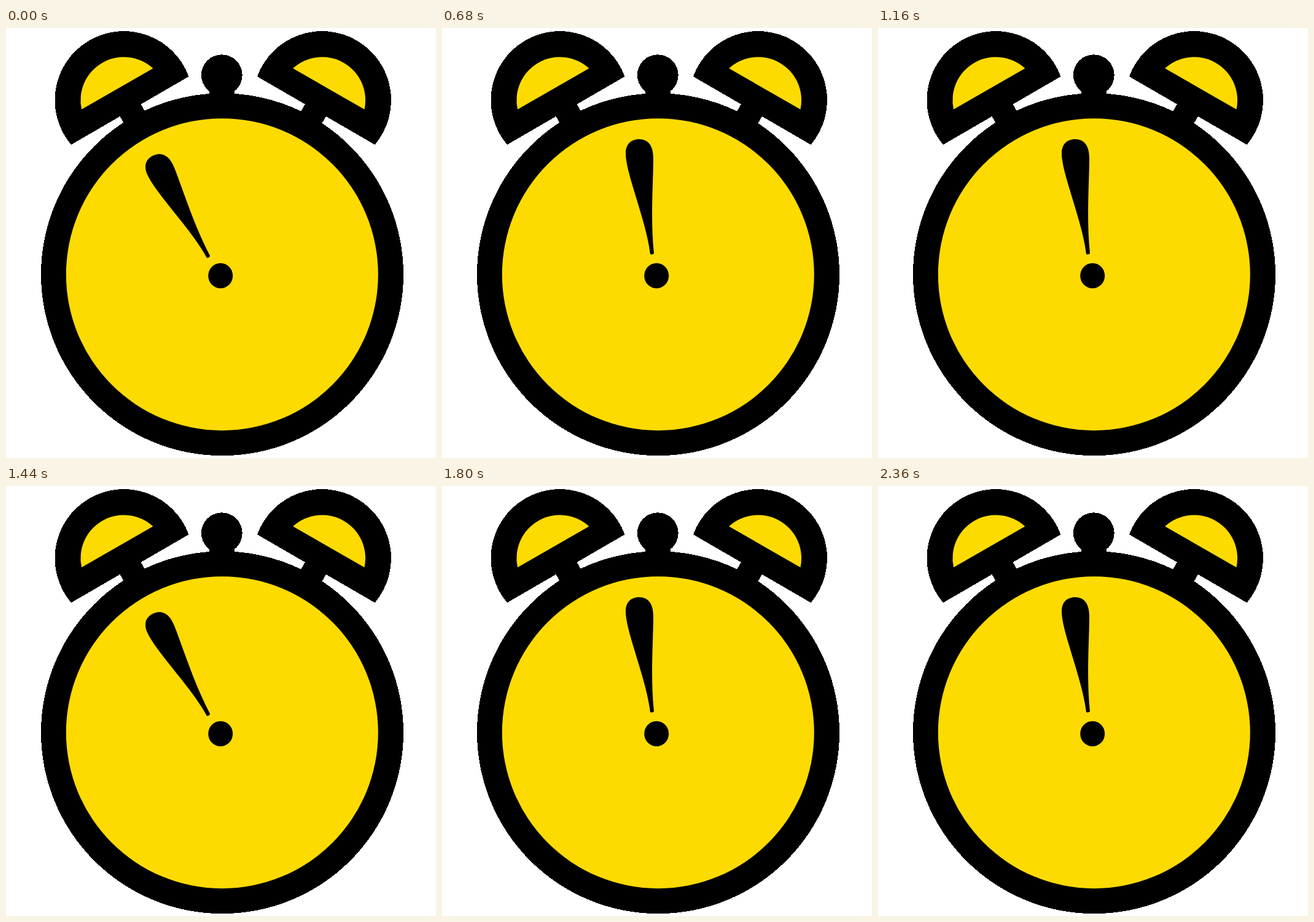
These frames come from a looping animation (700x700 px, 2400 ms). An HTML page:

```html
<!DOCTYPE html>
<html lang="en">
<head>
<meta charset="utf-8">
<title>Alarm clock</title>
<style>
  html, body { margin: 0; width: 100%; height: 100%; overflow: hidden; background: #fff; }
  svg { display: block; width: 100vw; height: 100vh; }
  .yellow { fill: #fddb00; }
  .crisp { shape-rendering: crispEdges; }
</style>
</head>
<body>
<svg viewBox="0 0 700 700">
  <defs>
    <g id="bell">
      <path class="crisp" d="M106 190A112.400 112.400 0 1 1 297.500 79Z"/>
      <path class="crisp" d="M185 143L219 123L234 149L200 169Z"/>
      <path class="yellow" d="M123 132.500A70.400 70.400 0 0 1 239.300 65.700Z"/>
    </g>
  </defs>
  <use href="#bell"/>
  <use href="#bell" transform="translate(706.500 0) scale(-1 1)"/>
  <g class="crisp">
    <circle cx="351.300" cy="76.700" r="33.400"/>
    <rect x="331" y="98" width="41" height="22"/>
    <circle cx="352" cy="401.200" r="295"/>
  </g>
  <circle class="yellow" cx="351.800" cy="401.200" r="254"/>
  <ellipse cx="349.200" cy="403.300" rx="20" ry="20.500"/>
  <path id="hand" d="M339 368C333 315 299 237 299 204C299 190 307 181 321 181C336 181 344 192 344 212C344 250 339 310 345 367Q342 370 339 368Z"/>
</svg>
<script>
  // The hand ticks across the dial and back, twice per 2400 ms loop.
  const cycle = 1200;
  const ticks = [
    { until: 400, angle: -21.7 },
    { until: 800, angle: 0 },
    { until: 1120, angle: 43.1 },
    { until: cycle, angle: 0 },
  ];
  const hand = document.getElementById("hand");
  const start = performance.now();

  function draw(now) {
    const time = Math.max(0, now - start) % cycle;
    const { angle } = ticks.find(tick => time < tick.until);
    hand.setAttribute("transform", `rotate(${angle} 349 402.5)`);
    requestAnimationFrame(draw);
  }
  draw(start);
</script>
</body>
</html>
```
